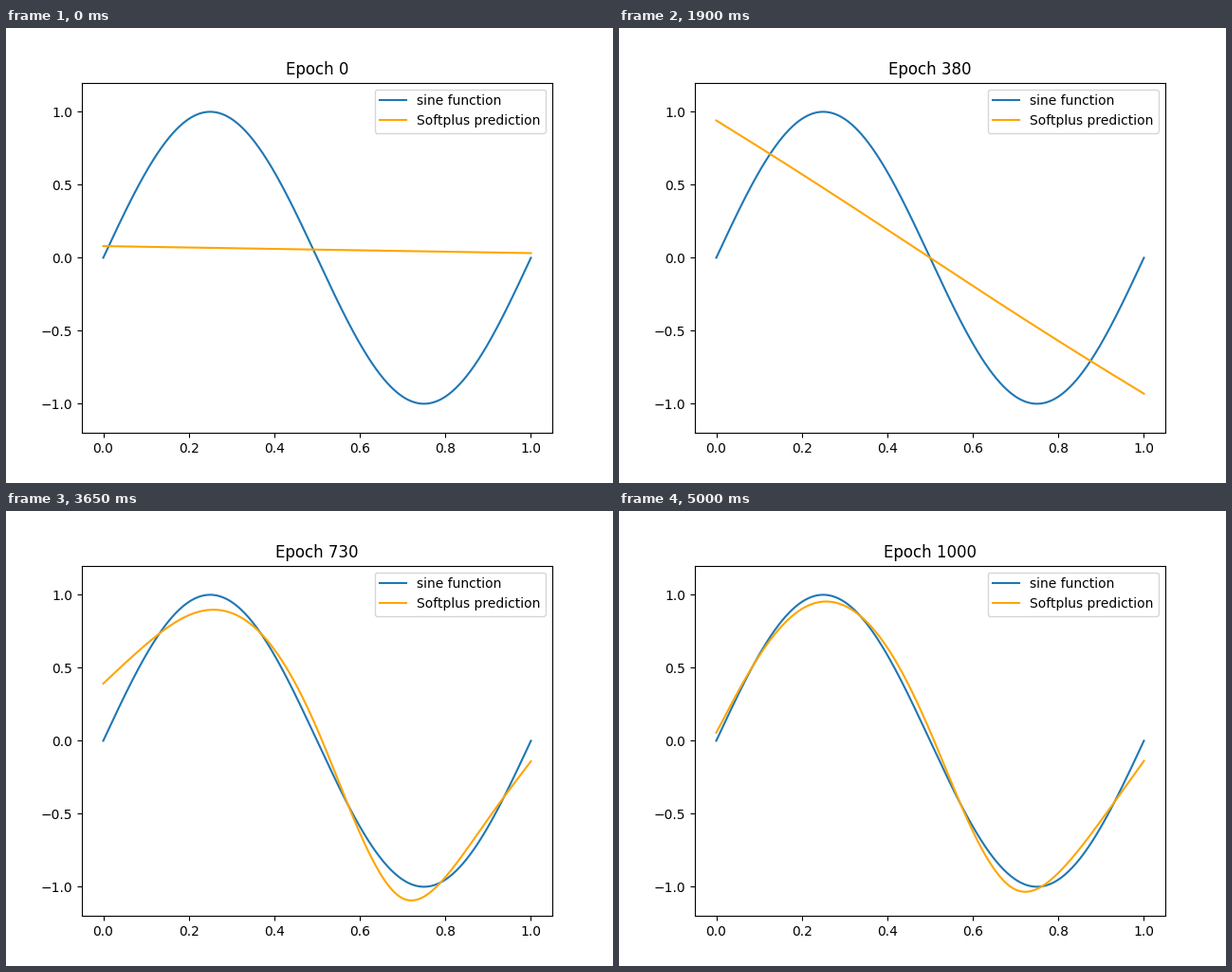
Animation of 640x480 px, one loop 5.05 s. Source, as a matplotlib script:

```python
import numpy as np
import matplotlib.pyplot as plt
from matplotlib.animation import FuncAnimation

FRAMES = 101
INTERVAL = 50
EPOCHS_PER_FRAME = 10

knots = np.linspace(0, 1, 11)
x = np.linspace(0, 1, 500)


def bow(start, end, bend):
    """Line from start to end, bent upwards by a parabola."""
    return start + (end - start) * knots + bend * knots * (1 - knots)


def mix(a, b, t):
    return a + (b - a) * t


def spline_matrix(n, pts):
    """Matrix taking n evenly spaced values to a natural cubic spline at pts."""
    h = 1 / (n - 1)
    system, rhs = np.eye(n), np.zeros((n, n))
    for i in range(1, n - 1):
        system[i, i - 1:i + 2] = 1, 4, 1
        rhs[i, i - 1:i + 2] = np.array([6, -12, 6]) / h**2
    curvature = np.linalg.solve(system, rhs)
    seg = np.minimum((pts / h).astype(int), n - 2)
    b = (pts / h - seg)[:, None]
    a = 1 - b
    eye = np.eye(n)
    return (a * eye[seg] + b * eye[seg + 1]
            + h**2 / 6 * ((a**3 - a) * curvature[seg]
                          + (b**3 - b) * curvature[seg + 1]))


flat = bow(0.933, -0.945, 0.048)
sigmoid = np.array([0.972, 0.795, 0.605, 0.402, 0.19, -0.025,
                    -0.235, -0.427, -0.6, -0.748, -0.875])
valley = np.array([0.84, 0.812, 0.735, 0.59, 0.35, 0.0,
                   -0.445, -0.84, -0.875, -0.6, -0.262])
deep = np.array([0.66, 0.745, 0.8, 0.735, 0.49, 0.03,
                 -0.56, -0.995, -0.93, -0.54, -0.14])
swing = np.array([0.42, 0.67, 0.86, 0.87, 0.62, 0.08,
                  -0.63, -1.08, -0.935, -0.535, -0.14])
wave = np.array([0.168, 0.575, 0.86, 0.905, 0.655, 0.09,
                 -0.64, -1.045, -0.88, -0.53, -0.175])
final = np.array([0.055, 0.58, 0.903, 0.925, 0.638, 0.065,
                  -0.62, -1.02, -0.905, -0.545, -0.138])

stages = {
    0: bow(0.08, 0.032, 0.0),
    20: bow(0.27, -0.33, 0.06),
    40: bow(0.74, -0.94, 0.15),
    55: bow(0.95, -1.153, 0.2),
    70: bow(0.97, -1.08, 0.22),
    90: bow(0.926, -0.992, 0.212),
    120: bow(0.928, -0.977, 0.15),
    220: bow(0.933, -0.951, 0.06),
    250: flat,
    330: mix(flat, sigmoid, 0.08),
    440: mix(flat, sigmoid, 0.47),
    490: sigmoid,
    540: mix(sigmoid, valley, 0.18),
    580: mix(sigmoid, valley, 0.55),
    620: valley,
    660: deep,
    720: swing,
    840: wave,
    1000: final,
}
times = np.array(list(stages), float)
values = np.array(list(stages.values()))

# Monotone slopes so that no value overshoots between stages
gaps = np.diff(times)[:, None]
rates = np.diff(values, axis=0) / gaps
before, after = rates[:-1], rates[1:]
w1, w2 = 2 * gaps[1:] + gaps[:-1], gaps[1:] + 2 * gaps[:-1]
same = before * after > 0
slopes = np.zeros_like(values)
slopes[1:-1][same] = ((w1 + w2) / (w1 / np.where(same, before, 1)
                                   + w2 / np.where(same, after, 1)))[same]
slopes[0], slopes[-1] = rates[0] * 0.6, rates[-1] * 0.5

to_curve = spline_matrix(len(knots), x)


def prediction(epoch):
    i = min(np.searchsorted(times, epoch, side="right") - 1, len(times) - 2)
    h = times[i + 1] - times[i]
    t = (epoch - times[i]) / h
    ease = t * t * (3 - 2 * t)
    y = (mix(values[i], values[i + 1], ease)
         + h * t * (1 - t)**2 * slopes[i]
         - h * t * t * (1 - t) * slopes[i + 1])
    return to_curve @ y


fig, ax = plt.subplots(figsize=(6.4, 4.8), dpi=100)
ax.plot(x, np.sin(2 * np.pi * x), label="sine function")
line, = ax.plot(x, prediction(0), color="orange", label="Softplus prediction")
ax.set_ylim(-1.2, 1.2)
ax.legend(loc="upper right")
title = ax.set_title("Epoch 0")


def update(frame):
    epoch = frame * EPOCHS_PER_FRAME
    line.set_ydata(prediction(epoch))
    title.set_text(f"Epoch {epoch}")
    return line, title


anim = FuncAnimation(fig, update, frames=FRAMES, interval=INTERVAL,
                     repeat=True, repeat_delay=0)
plt.show()
```
